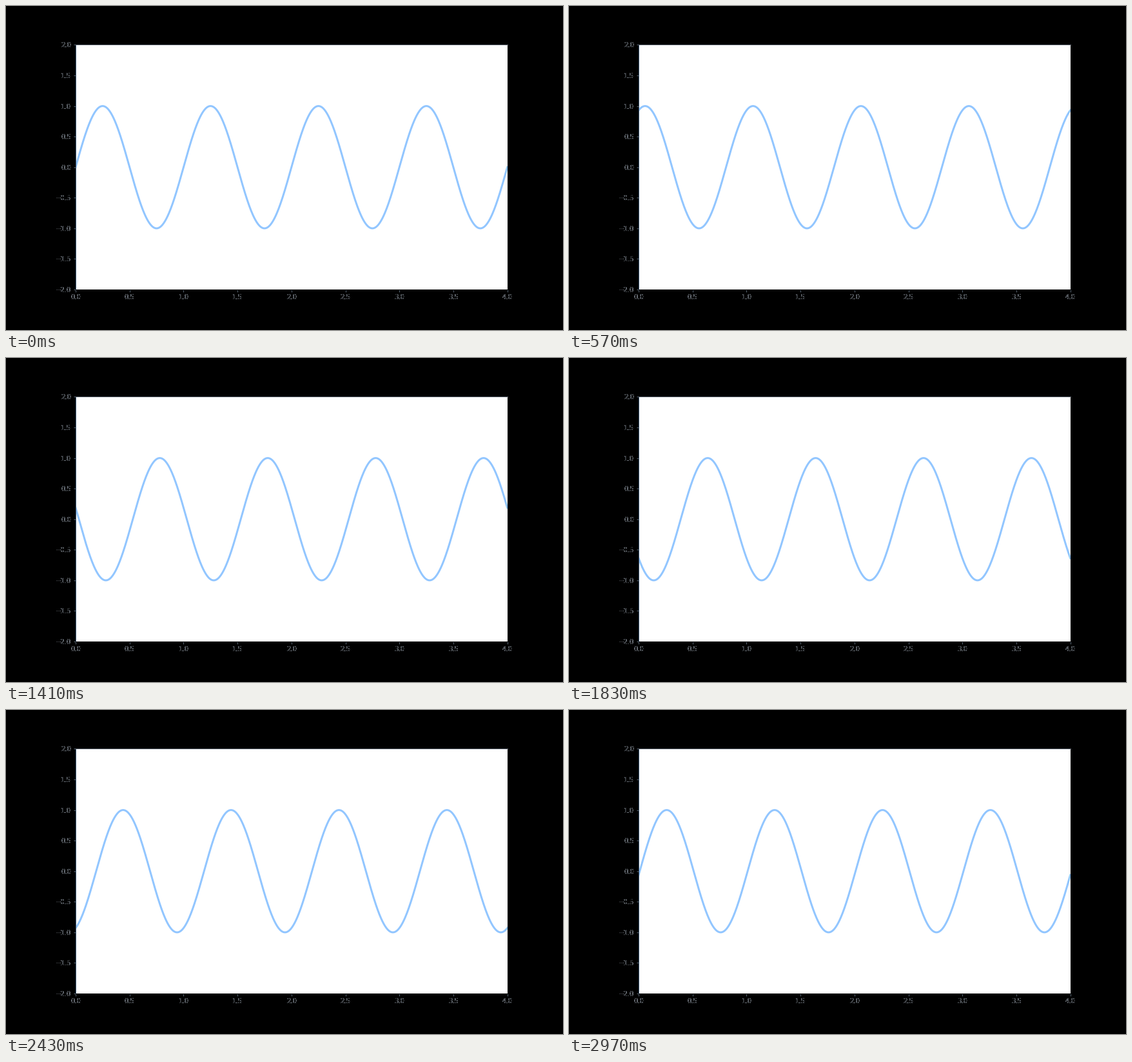
Write a matplotlib script that moves like this. It is 864 by 504 pixels and loops after 3000 ms.

```python
import matplotlib.pyplot as plt
import numpy as np
from matplotlib.animation import FuncAnimation

FRAMES = 100
INTERVAL = 30
BLUE = "#92c6ff"
FRINGE = "#e2efff"
BOX = [0.125, 0.125, 0.775, 0.755]

plt.rcParams.update({"font.family": "DejaVu Sans", "font.size": 10})
fig = plt.figure(figsize=(12, 7), dpi=72, facecolor="black")


def add_layer(label_color, tick_color="none", face="none"):
    """Axes on the shared box; stacked layers build up the label outlines."""
    ax = fig.add_axes(BOX, facecolor=face)
    ax.set(xlim=(0, 4), ylim=(-2, 2))
    ax.set_xticks(np.arange(0, 4.1, 0.5))
    ax.set_yticks(np.arange(-2, 2.1, 0.5))
    ax.tick_params(color=tick_color, labelcolor=label_color)
    ax.spines[:].set_visible(False)
    return ax


ax = add_layer(FRINGE, tick_color="#6f7f90", face="white")
for side, color in zip(("left", "top", "right", "bottom"),
                       ("#49637f", "#5c6470", "black", "black")):
    ax.spines[side].set(visible=True, color=color, linewidth=1)

# Black over light text leaves only the soft glyph edges visible.
for color in (FRINGE, FRINGE, "black"):
    add_layer(color)

x = np.linspace(0, 4, 1000)
line, = ax.plot([], [], color=BLUE, lw=3)


def update(i):
    line.set_data(x, np.sin(2 * np.pi * (x + i / FRAMES)))
    return line,


anim = FuncAnimation(fig, update, frames=FRAMES, interval=INTERVAL,
                     repeat=True, repeat_delay=0)
plt.show()
```
